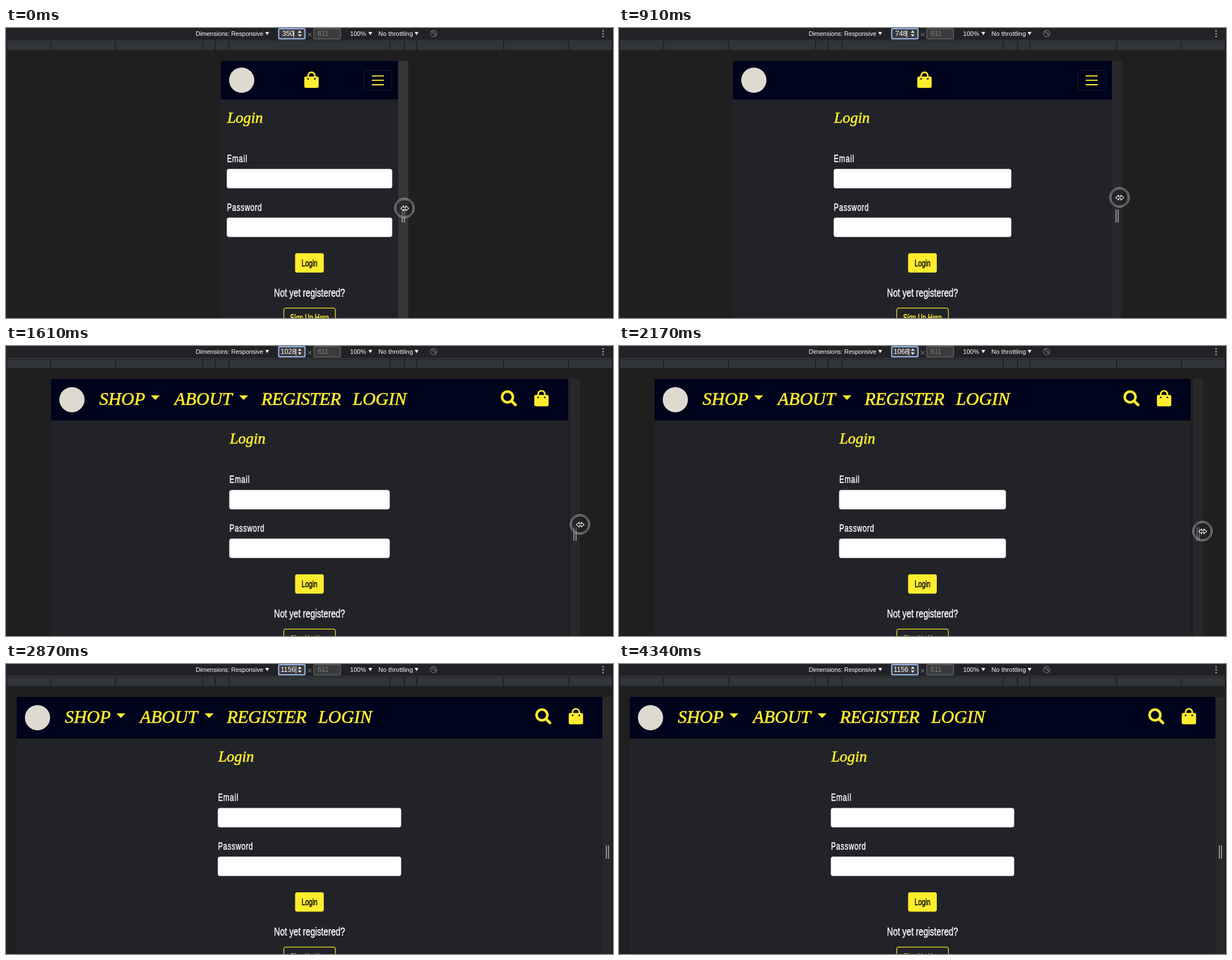
Animation, 1083 px wide and 517 px high, one loop 4.41 s. Source, as an HTML page:

```html
<!DOCTYPE html>
<html lang="en">
<head>
<meta charset="utf-8">
<title>Responsive login page</title>
<style>
  html, body { margin: 0; width: 100%; height: 100%; overflow: hidden; background: #1f1f20; }
  svg { display: block; width: 1083px; height: 517px; }
  text { white-space: pre; }
  .bar { font: 11.1px "Liberation Sans", Arial, sans-serif; fill: #fff; }
  .num { font-size: 12.2px; }
  .script { font: italic 32px "Liberation Serif", "Times New Roman", serif; fill: #ffed2d; stroke: #ffed2d; stroke-width: .7; }
  .narrow { font: 18px "Liberation Sans", Arial, sans-serif; fill: #f4f4f4; stroke: #f4f4f4; stroke-width: .6; }
  .field { fill: #fff; stroke: #ced4da; stroke-width: .8; }
  .yellow { fill: #ffed2d; }
  .line { fill: none; stroke: #ffed2d; }
</style>
</head>
<body>
<svg viewBox="0 0 1083 517">
  <defs>
    <g id="bag">
      <rect class="yellow" x="-12.8" y="8.5" width="25.6" height="20.3" rx="3"/>
      <path class="line" stroke-width="2.8" d="M-6 12V7a6 6 0 0 1 12 0v5"/>
      <g fill="#00031c"><circle cx="-6" cy="12.6" r="1.5"/><circle cx="6" cy="12.6" r="1.5"/></g>
    </g>
    <path id="drop" d="M-3.5 -2.7h7l-3.5 5.8z" fill="#f1f1f1"/>
    <path id="caret" class="yellow" d="M0 0h16l-8 8.3z"/>
  </defs>

  <rect width="1083" height="517" fill="#1f1f20"/>
  <rect width="1083" height="22" fill="#212225"/>
  <rect y="21.6" width="1083" height="1" fill="#4b4c4f"/>
  <rect x="2" y="24" width="1079" height="15" fill="#31353a"/>
  <path id="ticks" stroke="#1b1c1e" stroke-width="1.6"/>

  <g class="bar">
    <text x="338.5" y="13.7" letter-spacing="-.07">Dimensions: Responsive</text>
    <use href="#drop" x="466" y="9.7"/>
    <rect x="486.5" y="1.2" width="47" height="18" rx="2" fill="#3a3b3d" stroke="#9fc2f8" stroke-width="2"/>
    <text id="number" class="num" y="14.4"></text>
    <path id="blink" d="M0 4v13" stroke="#fff"/>
    <path d="M520.5 8.6l3.5-4 3.5 4zM520.5 11.6l3.5 4 3.5-4z" fill="#eee"/>
    <path d="M538.5 8.5l6.5 6.5m0-6.5l-6.5 6.5" stroke="#9a9b9d"/>
    <rect x="549" y="1" width="48" height="18.5" rx="1.5" fill="#3a3b3d" stroke="#77787a"/>
    <text class="num" x="556" y="14.4" style="fill:#7c7d7f">611</text>
    <text x="614" y="13.7">100%</text>
    <use href="#drop" x="650" y="9.7"/>
    <text x="664.5" y="13.7" letter-spacing=".15">No throttling</text>
    <use href="#drop" x="732.5" y="9.7"/>
    <g fill="none" stroke="#88898b">
      <circle cx="763" cy="10" r="5.6"/><path d="M758.5 5.5l9 9m-6.5-9l6.5 6.5"/>
    </g>
    <g fill="#a5a6a8"><circle cx="1065.3" cy="5.2" r="1.4"/><circle cx="1065.3" cy="10.2" r="1.4"/><circle cx="1065.3" cy="15.2" r="1.4"/></g>
  </g>

  <rect id="page" y="58.7" height="459" fill="#222328"/>
  <rect id="nav" y="58.7" fill="#00031c"/>
  <circle id="logo" r="22.5" fill="#dedad0"/>

  <g id="compact">
    <use href="#bag" x="545" y="78"/>
    <g id="menu">
      <rect x="-61" y="75.5" width="49.5" height="35.5" rx="4" fill="none" stroke="#191d36"/>
      <path class="line" stroke-width="2.1" d="M-47 85.5h21.5m0 7.8h-21.5m0 7.8h21.5"/>
    </g>
  </g>
  <g id="wide">
    <g id="links" class="script">
      <text x="86" y="104.5">SHOP</text>
      <use href="#caret" x="178" y="88" stroke="none"/>
      <text x="220" y="104.5">ABOUT</text>
      <use href="#caret" x="335.5" y="88" stroke="none"/>
      <text x="375" y="104.5" letter-spacing="-.5">REGISTER</text>
      <text x="538" y="104.5">LOGIN</text>
    </g>
    <g id="tools">
      <circle class="line" cx="-107.8" cy="90.9" r="9.6" stroke-width="4.5"/>
      <path class="line" stroke-width="5" stroke-linecap="round" d="M-100.5 98.2l6.9 6.7"/>
      <use href="#bag" x="-47.2" y="78.8"/>
    </g>
  </g>

  <g id="content">
    <g id="form">
      <text class="script" x=".5" y="169" style="font-size:27.3px">Login</text>
      <text class="narrow" transform="translate(0 238.5) scale(.716 1)" letter-spacing="1.3">Email</text>
      <text class="narrow" transform="translate(0 326) scale(.716 1)" letter-spacing="1.1">Password</text>
      <rect class="field" y="251.5" height="34" rx="3.6"/>
      <rect class="field" y="338.3" height="34" rx="3.6"/>
    </g>
    <rect class="yellow" x="515.8" y="401.5" width="51.2" height="34.5" rx="3.6"/>
    <rect class="line" x="495.6" y="499.3" width="92" height="34.5" rx="3.6" stroke-width="1.2"/>
    <g class="narrow" text-anchor="middle">
      <text transform="translate(541.5 425) scale(.716 1)" style="font-size:16.3px;fill:#111;stroke:#111">Login</text>
      <text transform="translate(541.5 478.8) scale(.716 1)" style="font-size:21px">Not yet registered?</text>
      <text transform="translate(541.5 522.3) scale(.716 1)" style="font-size:16.1px;fill:#ffed2d;stroke:#ffed2d">Sign Up Here</text>
    </g>
  </g>

  <g id="grip">
    <rect y="58.7" width="18" height="459"/>
    <path d="M7.2 323.5v23.5m3.8 0v-23.5" stroke="#b4b5b6" stroke-width="1.5"/>
  </g>
  <g id="cursor" fill="none" stroke="#c4c4c4">
    <circle r="17.5" fill="#202124" fill-opacity=".4"/>
    <circle r="15.3" stroke-width=".9"/>
    <path d="M-6.5 .5l5-4.3v2.7h4v-2.7l5 4.3-5 4.3V2.1h-4v2.7z" fill="#111" stroke="#fff" stroke-width="1.1"/>
  </g>
  <rect width="1.6" height="517" fill="#3a1c2e"/>
  <rect x="1081.5" width="1.5" height="517" fill="#19191b"/>
</svg>
<script>
  const LOOP = 4410, STEP = 70, CENTER = 541.5, SCALE = 0.904;
  const $ = id => document.getElementById(id);
  const set = (el, attrs) => { for (const k in attrs) el.setAttribute(k, attrs[k]); };
  const move = (id, x, y = 0) => $(id).setAttribute('transform', `translate(${x} ${y})`);
  const show = (id, on) => { $(id).style.display = on ? '' : 'none'; };

  // time, viewport width, painted page width, pointer x, pointer y
  const keys = [
    [0, 350, 350, 711, 321], [140, 350, 350, 711, 321], [210, 360, 360, 717, 319],
    [280, 396, 396, 738, 314], [490, 546, 546, 812, 303], [700, 667, 667, 867, 300],
    [910, 748, 748, 893, 302], [1260, 850, 850, 949, 306], [1470, 955, 948, 996, 312],
    [1610, 1028, 1020, 1024, 318], [1680, 1034, 1034, 1026, 321],
    [1820, 1038, 1038, 1028, 326], [2030, 1038, 1038, 1028, 328], [2100, 1038, 1038, 1028, 328],
    [2170, 1068, 1058, 1041, 330], [2380, 1105, 1105, 1059, 332], [2520, 1105, 1105, 1059, 332],
    [2870, 1156, 1156, 1090, 336], [LOOP, 1156, 1156, 1090, 336]
  ];

  function pose(t) {
    const i = keys.findIndex(k => k[0] > t);
    const a = keys[i - 1], b = keys[i], f = (t - a[0]) / (b[0] - a[0]);
    return a.map((v, n) => v + (b[n] - v) * f);
  }

  function draw(t) {
    const [, width, pageWidth, x, y] = pose(t);
    const shown = pageWidth * SCALE, left = CENTER - shown / 2, right = CENTER + shown / 2;
    const isWide = pageWidth >= 992;

    const label = Math.round(width);
    $('number').textContent = label;
    $('number').setAttribute('x', label < 1000 ? 493 : 490);
    move('blink', label < 1000 ? 513.5 : 517.3);
    show('blink', t < 3290 || (t >= 3780 && t < 4340));

    set($('page'), { x: left, width: shown });
    set($('nav'), { x: left, width: shown, height: isWide ? 74.1 : 68.6 });
    set($('logo'), { cx: left + 37.2, cy: isWide ? 95.7 : 93 });
    show('compact', !isWide);
    show('wide', isWide);
    move('menu', right);
    move('links', left);
    move('tools', right);

    const share = isWide ? 1 / 3 : pageWidth >= 576 ? 1 / 2 : 1;
    const fieldWidth = shown * share - 24 * SCALE;
    move('content', 0, isWide ? 5.4 : 0);
    move('form', CENTER - fieldWidth / 2);
    document.querySelectorAll('.field').forEach(el => el.setAttribute('width', fieldWidth));

    move('grip', CENTER + width * SCALE / 2);
    $('grip').firstElementChild.setAttribute('fill', t < 280 ? '#33373a' : '#28282a');
    move('cursor', x, y);
    show('cursor', t < 2870);
  }

  $('ticks').setAttribute('d', [79.5, 195.3, 350.8, 373.3, 397.8, 685.3, 711, 733, 887.8, 1003.5]
    .map(x => `M${x} 24v15`).join(''));

  const start = performance.now();
  function tick() {
    const t = (performance.now() - start) % LOOP;
    draw(Math.floor(t / STEP) * STEP);
    requestAnimationFrame(tick);
  }
  tick();
</script>
</body>
</html>
```
